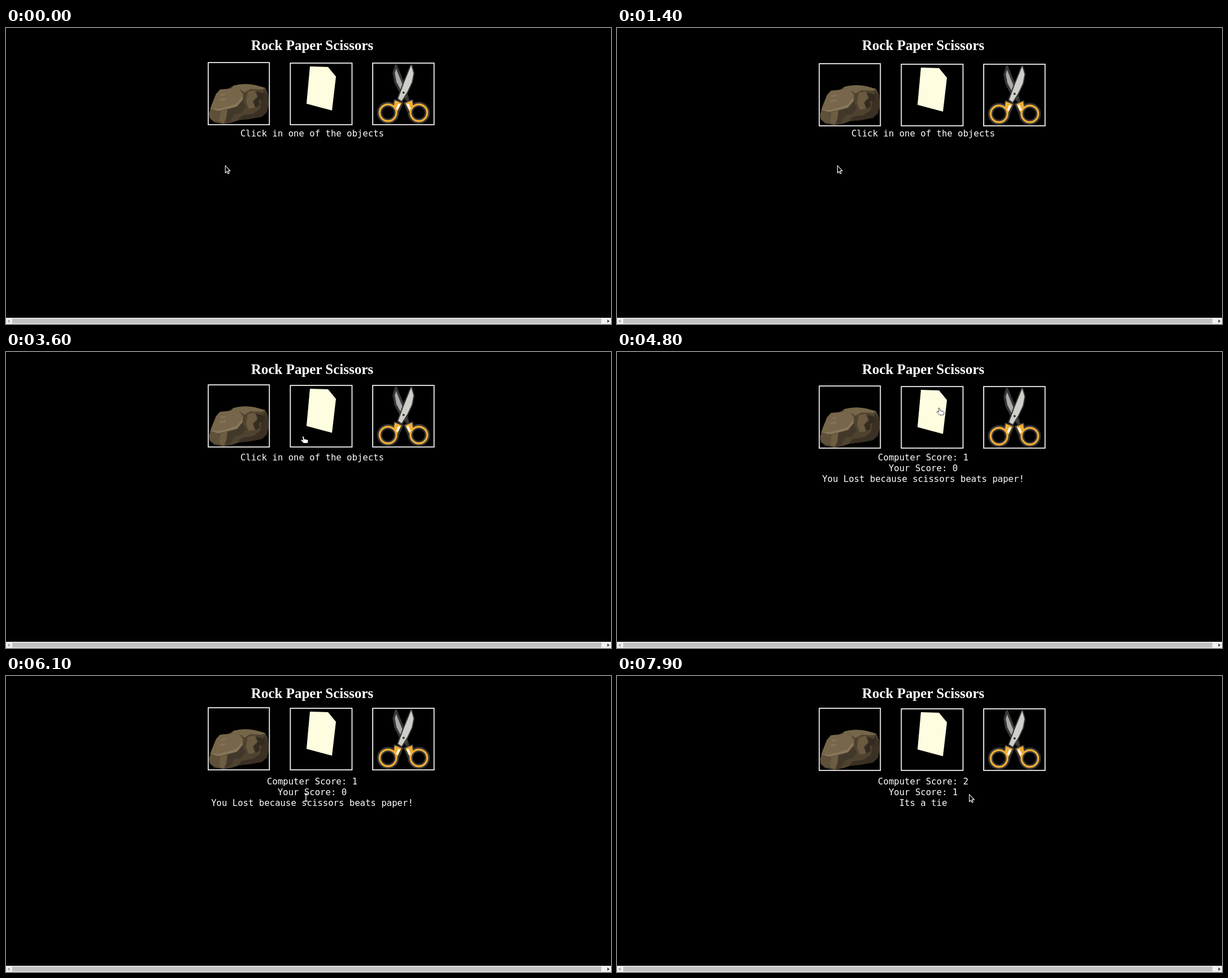
Animation of 1069 by 524 pixels, one loop 8000 ms. Source, as an HTML page:

```html
<!DOCTYPE html>
<html lang="en">
<head>
<meta charset="utf-8">
<title>Hand game</title>
<style>
  html, body { margin: 0; width: 100%; height: 100%; overflow: hidden; background: #000; }
  svg { display: block; width: 1069px; height: 524px; }
  text { fill: #fff; text-anchor: middle; white-space: pre; }
  .title { font: bold 25px "Liberation Serif", serif; }
  .line { font: 15.62px "DejaVu Sans Mono", monospace; }
  .card { fill: none; stroke: #fff; stroke-width: 1.7; }
  .cursor { stroke-linejoin: round; }
</style>
</head>
<body>
<svg viewBox="0 0 1069 524">
  <rect width="1069" height="524"/>
  <text class="title" x="541" y="39">Rock Paper Scissors</text>
  <text class="line" x="541" y="192"></text>
  <text class="line" x="541" y="211"></text>
  <text class="line" x="541" y="230"></text>

  <g id="cards">
    <g id="rock">
      <path fill="#4f4330" d="M359 151L363 136 371 117 378 109 392 108 402 102Q420 97 440 101L458 106 463 117 464 137 461 149 452 157 431 161 412 163 400 167 384 170 368 167 360 160Z"/>
      <path fill="#3a3023" d="M456 110L463 119 464 137 461 149 452 157 431 161 410 163 417 155 436 152 449 143 451 127Z"/>
      <path fill="#75664a" d="M402 102Q420 97 440 101L458 106 452 109 432 108 421 114 414 109 398 108Z"/>
      <path fill="#77664a" d="M361 143L371 117 378 109 397 107 413 109 419 117 418 126 408 137 392 141 376 145Z"/>
      <path fill="#88775a" d="M361 143L376 143 392 139 407 134 418 121 418 127 408 139 392 143 375 147Z"/>
      <path fill="#5f5139" d="M359 151L362 144 376 147 379 166 368 165 360 159Z"/>
      <path fill="#6d5d43" d="M378 147L391 144 389 160 384 169 377 166Z"/>
      <path fill="#42382a" d="M392 145L409 139 418 128 424 140 415 151 404 152 396 166 388 168Z"/>
      <path fill="#695a40" d="M427 113L439 110 444 121 436 130 440 141 429 143 424 130Z"/>
      <path fill="#332b20" d="M442 112L456 116 455 126 447 128 448 137 441 141 437 130 445 122Z"/>
      <path fill="#85745a" d="M380 117l9-1-2 3-8 1zM377 126l10-2 2 3-11 2z"/>
    </g>

    <path id="sheet" fill="#fefde0" d="M537 68L569 69 583 86 576 146 557 141 531 134Z"/>

    <g id="scissors" stroke-linejoin="round">
      <path fill="#aaa9a5" stroke="#373737" stroke-width="4" d="M689 66L685 80 688 96 699 117 711 130 704 103Z"/>
      <g id="handles"></g>
      <path fill="#cfcec9" stroke="#373737" stroke-width="4" d="M716 66L720 80 717 96 709 113 699 129 693 125 703 98Z"/>
      <path fill="#cfcec9" d="M716 66L720 80 717 96 709 113 699 129 693 125 703 98Z"/>
      <circle cx="702.5" cy="114.5" r="2" fill="#373737"/>
    </g>

    <rect class="card" x="357.4" y="61.2" width="108" height="110"/>
    <rect class="card" x="502.4" y="62.2" width="109" height="109"/>
    <rect class="card" x="647.9" y="62.2" width="108.5" height="109"/>
  </g>

  <g id="scrollbar">
    <rect y="513" width="1069" height="11" fill="#f1f1f1"/>
    <rect x="11" y="514.5" width="1041" height="8.5" fill="#c1c1c1"/>
    <path fill="#a3a3a3" d="M6.5 516v6l-4-3z"/>
    <path fill="#404040" d="M1062.5 516v6l4-3z"/>
  </g>

  <g id="pointer">
    <path class="cursor" data-kind="arrow" fill="#000" stroke="#fff" stroke-width="1.1" d="M.5 .5V13.5L3.4 10.8 5.3 15 7.3 14.1 5.4 9.9H9.2Z"/>
    <path class="cursor" data-kind="hand" fill="#fff" stroke="#000" stroke-width=".7" d="M-1.3 .8Q0-.8 1.2 .8L2 5 7.5 6.2Q9.4 7 9 9L7.7 12.5H1L-4 7.4Q-3.8 5.6-2 6.2L-.3 7.3Z"/>
    <path class="cursor" data-kind="beam" fill="none" stroke="#fff" stroke-width="1.3" d="M-3-6.5H-1L0-5.5 1-6.5H3M0-5.5V5.5M-3 6.5H-1L0 5.5 1 6.5H3"/>
  </g>
</svg>
<script>
const LOOP = 8000, STEP = 100;

// Each handle is a ring plus an arm; the second is mirrored about the pivot.
const handle = `
  <path fill="#f0ad36" stroke="#373737" stroke-width="4" d="M687 128L700 133 692 151 684 141Z"/>
  <circle cx="675" cy="150" r="15" fill="#000" stroke="#373737" stroke-width="9"/>
  <circle cx="675" cy="150" r="14.8" fill="none" stroke="#f0ad36" stroke-width="3.4"/>
  <path fill="#f0ad36" d="M687 128L699 133 691 149 685 140Z"/>
  <path fill="#fff8e8" d="M693 134l4 1-5 10-3-2z"/>`;
document.getElementById('handles').innerHTML =
  `<g transform="translate(1404.5) scale(-1 1)">${handle}</g><g>${handle}</g>`;

// time, bob phase in cycles
const bob = [[0, .715], [1400, 2.366], [2300, 3.424], [3600, 3.822],
  [4800, 4.74], [6100, 6.075], [7900, 8.134], [8000, 8.25]];

// time, x, y
const route = [[0, 387, 243], [500, 388, 244], [1000, 388, 244], [1400, 389, 243],
  [2800, 389, 243], [3600, 525, 149], [4200, 568, 99], [4800, 569, 99],
  [5400, 538, 254], [5700, 535, 254], [6100, 530, 215], [6500, 552, 115],
  [7200, 560, 118], [7900, 622, 209], [8000, 622, 209]];

const score = (computer, you, result) =>
  [`Computer Score: ${computer}`, `Your Score: ${you}`, result];
const messages = [
  [0, ['Click in one of the objects', '', '']],
  [4300, score(1, 0, 'You Lost because scissors beats paper!')],
  [6600, score(2, 0, 'You Lost because scissors beats paper!')],
  [6900, score(2, 1, 'You Won because paper beats rock!')],
  [7200, score(2, 1, 'Its a tie')]
];

const smooth = u => u * u * (3 - 2 * u);

function sample(track, t, ease = u => u) {
  const i = Math.max(1, track.findIndex(p => p[0] >= t));
  const a = track[i - 1], b = track[i];
  const u = ease((t - a[0]) / (b[0] - a[0]));
  return a.slice(1).map((v, k) => v + (b[k + 1] - v) * u);
}

const cards = document.getElementById('cards');
const pointer = document.getElementById('pointer');
const cursors = document.querySelectorAll('.cursor');
const lines = document.querySelectorAll('.line');

function cursorKind(x, y, shift, text) {
  const overCard = [357, 502, 648].some(left => x >= left && x <= left + 109);
  if (overCard && y > 61 + shift && y < 172 + shift) return 'hand';
  const row = text[Math.floor((y - 178) / 18.8)];
  return row && Math.abs(x - 541) < row.length * 4.7 ? 'beam' : 'arrow';
}

function draw(t) {
  const [phase] = sample(bob, t);
  const shift = Math.round(-1 - 4.5 * Math.cos(phase * 2 * Math.PI));
  cards.setAttribute('transform', `translate(0 ${shift})`);

  const text = messages.filter(m => m[0] <= t).pop()[1];
  lines.forEach((line, i) => { line.textContent = text[i]; });

  const [x, y] = sample(route, t, smooth).map(Math.round);
  const kind = cursorKind(x, y, shift, text);
  pointer.setAttribute('transform', `translate(${x} ${y})`);
  cursors.forEach(c => { c.style.display = c.dataset.kind === kind ? '' : 'none'; });
}

const start = performance.now();
function tick() {
  const t = (performance.now() - start) % LOOP;
  draw(Math.floor(t / STEP) * STEP);
  requestAnimationFrame(tick);
}
tick();
</script>
</body>
</html>
```
